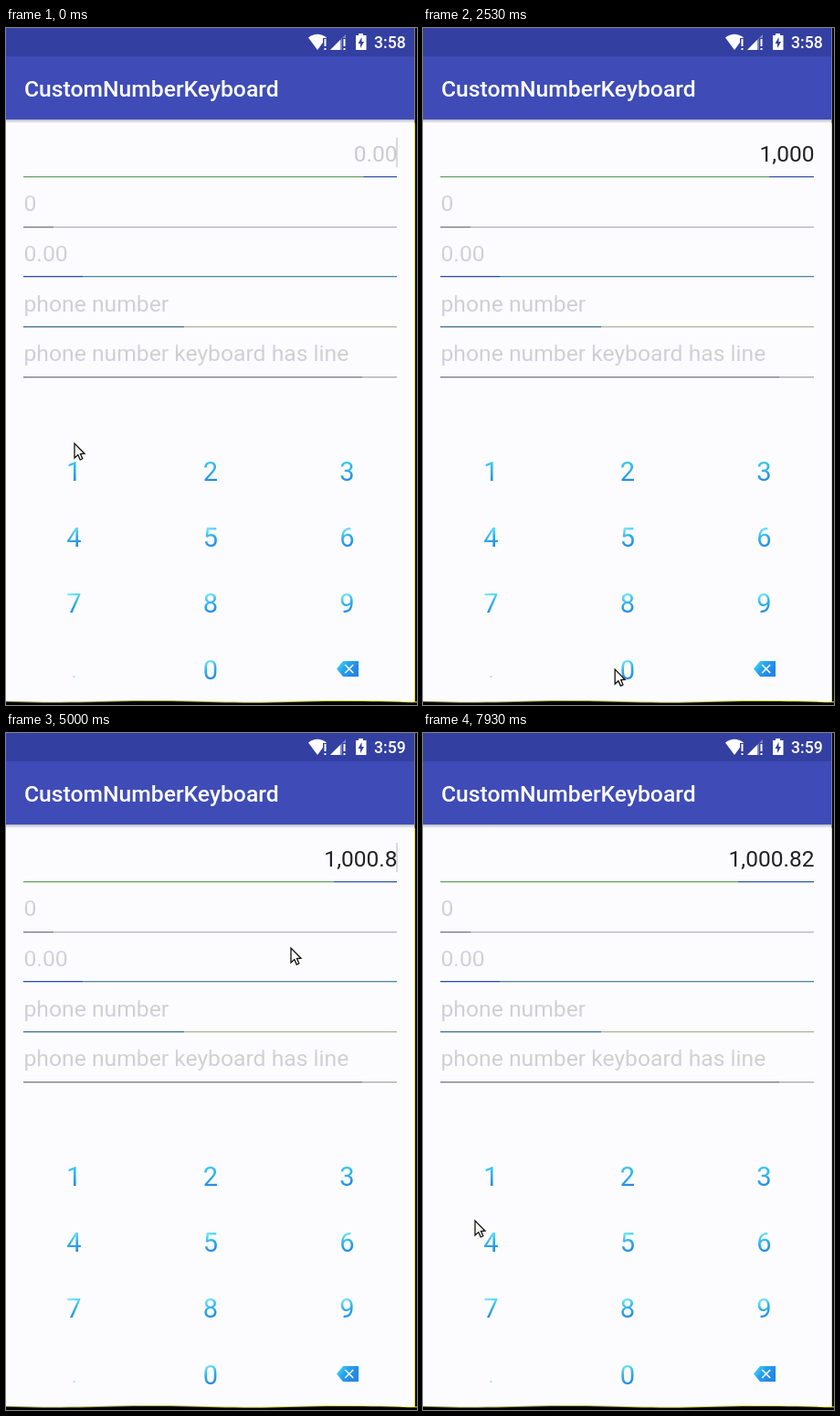
An HTML page with a canvas that plays this animation: 450x740 px, repeating every 8000 ms.

```html
<!DOCTYPE html>
<html lang="en">
<head>
<meta charset="utf-8">
<title>Number keyboard</title>
<style>
html, body { margin: 0; width: 100%; height: 100%; overflow: hidden; background: #000; }
canvas { display: block; }
</style>
</head>
<body>
<canvas id="stage" width="450" height="740"></canvas>
<script>
const ctx = document.getElementById('stage').getContext('2d');
const FONT = 'Roboto, "Open Sans", sans-serif';
const LOOP = 8000, BLINK = 500, TYPE_DELAY = 100, RIPPLE = 350, MOVE = 350;
const KEYS = '123456789.0<';
const PAD_TOP = 449, KEY_W = 149, KEY_H = 72;
const WHITE = '#fff', PAGE = '#fcfcfe', STATUS = '#3340a2';

// Where the pointer goes, when it arrives and when it taps there.
const stop = (x, y, at, ...taps) => ({ x, y, at, taps });
const stops = [
  stop(75, 454, 0, 30),
  stop(213, 701, 1130, 1140, 1300, 1820),
  stop(85, 703, 2850, 2980),
  stop(226, 634, 3420, 3440, 3590),
  stop(375, 639, 4200),
  stop(374, 698, 4400, 4480),
  stop(312, 235, 5000),
  stop(226, 488, 5270, 5300),
  stop(256, 212, 6130),
  stop(60, 250, 7000),
  stop(57, 533, 7900)
];

const keyX = i => 74.5 + 149.4 * (i % 3);
const keyY = i => 495 + 72.2 * Math.floor(i / 3);
const keyAt = (x, y) => Math.floor(x / KEY_W) + 3 * Math.floor((y - PAD_TOP) / KEY_H);
const taps = stops.flatMap(s => s.taps.map(at => ({ at, key: keyAt(s.x, s.y) })));

function pointerAt(t) {
  const next = stops.findIndex(s => s.at > t);
  if (next < 0) return stops[stops.length - 1];
  const a = stops[next - 1], b = stops[next];
  const leave = Math.max(a.at, b.at - MOVE);
  const u = Math.max(0, (t - leave) / (b.at - leave));
  const e = u * u * (3 - 2 * u);
  return { x: a.x + (b.x - a.x) * e, y: a.y + (b.y - a.y) * e };
}

function inputAt(t) {
  let raw = '', since = 0;
  for (const { at, key } of taps) {
    if (t < at + TYPE_DELAY) break;
    raw = KEYS[key] === '<' ? raw.slice(0, -1) : raw + KEYS[key];
    since = at + TYPE_DELAY;
  }
  const [whole, ...rest] = raw.split('.');
  const value = [whole.replace(/\B(?=(\d{3})+$)/g, ','), ...rest].join('.');
  return { value, caret: Math.floor((t - since) / BLINK) % 2 === 0 };
}

function gradient(x0, y0, x1, y1, ...colors) {
  const g = ctx.createLinearGradient(x0, y0, x1, y1);
  colors.forEach((c, i) => g.addColorStop(i / (colors.length - 1), c));
  return g;
}

function rect(x, y, w, h, fill) {
  ctx.fillStyle = fill;
  ctx.fillRect(x, y, w, h);
}

function poly(points, fill) {
  ctx.beginPath();
  points.forEach(([x, y]) => ctx.lineTo(x, y));
  ctx.closePath();
  ctx.fillStyle = fill;
  ctx.fill();
}

function text(str, x, y, size, fill, align = 'left', weight = 400) {
  ctx.font = `${weight} ${size}px ${FONT}`;
  ctx.textAlign = align;
  ctx.fillStyle = fill;
  ctx.fillText(str, x, y);
}

function alertMark(x) {
  rect(x - 1.5, 11, 4, 14, STATUS);
  rect(x, 12, 2, 8, WHITE);
  rect(x, 22, 2, 2, WHITE);
}

function drawStatus(t) {
  rect(0, 0, 447, 31, STATUS);
  ctx.beginPath();
  ctx.moveTo(341, 24);
  ctx.lineTo(331, 10.5);
  ctx.quadraticCurveTo(341, 3, 351, 10.5);
  ctx.fillStyle = WHITE;
  ctx.fill();
  alertMark(348.5);
  poly([[355, 24], [372, 24], [372, 7]], '#7d87c9');
  poly([[355, 24], [366, 24], [366, 13]], WHITE);
  alertMark(369.5);
  rect(386, 6, 5, 3, WHITE);
  rect(383, 8, 11.5, 16, WHITE);
  poly([[389.5, 10], [385.5, 17], [388, 17], [388, 22], [392, 15], [389.5, 15]], STATUS);
  text(t < 4500 ? '3:58' : '3:59', 403, 22, 17.6, WHITE, 'left', 500);
}

function drawHeader() {
  rect(0, 31, 447, 69, '#3f4cb7');
  rect(0, 100, 447, 4, gradient(0, 100, 0, 104, '#b9b9c6', PAGE));
  text('CustomNumberKeyboard', 20, 75, 24.7, WHITE, 'left', 500);
}

function drawField(row, hint, left, split, right) {
  const y = 145.5 + row * 54.7;
  if (row) text(hint, 19.5, y, 24.7, gradient(0, y - 18, 0, y, '#dad6e8', '#cfcfcd', '#d0d0e0'));
  const line = Math.round(162 + row * 54.7);
  rect(19, line, split - 19, 1.3, left);
  rect(split, line, 428 - split, 1.3, right);
}

function drawFields(t) {
  const { value, caret } = inputAt(t);
  const shown = value || '0.00';
  text(shown, 428.5, 145.5, 24.5, value ? '#222226' : '#cbc9d3', 'right');
  const split = 439 - ctx.measureText(shown).width;
  if (caret) rect(427.5, 120, 1, 32, '#b5b4ca');
  drawField(0, '', '#67a565', split, '#3559a8');
  drawField(1, '0', '#777784', 52, '#b3b3bb');
  drawField(2, '0.00', '#3449ad', 84, '#4d87a0');
  drawField(3, 'phone number', '#46708a', 195, '#abb99c');
  drawField(4, 'phone number keyboard has line', '#77777f', 390, '#a9a9a4');
}

function drawRipple(key, dt) {
  if (dt < 0 || dt > RIPPLE) return;
  const x = keyX(key) + 2, y = keyY(key) - 7;
  ctx.save();
  ctx.beginPath();
  ctx.rect(key % 3 * KEY_W, PAD_TOP + Math.floor(key / 3) * KEY_H, KEY_W, KEY_H);
  ctx.clip();
  ctx.globalAlpha = Math.min(1, (RIPPLE - dt) / 200);
  ctx.beginPath();
  ctx.arc(x, y, 8 + dt * 0.255, 0, Math.PI * 2);
  ctx.fillStyle = gradient(x, y - 30, x, y + 30, '#e6fbfb', '#e4f3fb', '#e9eefb');
  ctx.fill();
  ctx.restore();
}

function drawBackspace() {
  poly([[362, 700.5], [369, 692], [386, 692], [386, 709], [369, 709]],
    gradient(362, 692, 380, 706, '#4fe6f8', '#25a4ee', '#2585e6'));
  ctx.beginPath();
  for (const side of [-1, 1]) {
    ctx.moveTo(375.7 - 4.5 * side, 696);
    ctx.lineTo(375.7 + 4.5 * side, 705);
  }
  ctx.strokeStyle = WHITE;
  ctx.lineWidth = 1.6;
  ctx.stroke();
}

function drawKey(i, t) {
  const k = KEYS[i], x = keyX(i), y = keyY(i);
  if (k === '<') return drawBackspace();
  if (k === '.') {
    const lit = taps.some(p => p.key === i && t >= p.at && t <= p.at + RIPPLE);
    const s = lit ? 3.4 : 2;
    return rect(x - s / 2, 709 - s / 2, s, s, lit ? '#2a8ee8' : '#a4e6f3');
  }
  const top = i < 3 ? '#3bcbf3' : '#7deaf8';
  text(k, x, y, 29, gradient(x - 4, y - 21, x + 4, y - 1, top, '#2fb0ee', '#2589e7'), 'center');
}

// Black border with an uneven yellow fringe.
function drawFrame() {
  rect(447.5, 0, 2.5, 740, '#000');
  rect(447, 104, 1, 632, '#d8d850');
  const edge = [];
  for (let x = 0; x <= 450; x += 10) edge.push([x, 736.8 + 0.9 * Math.sin(x / 34)]);
  poly([...edge.map(([x, y]) => [x, y - 1]), [450, 740], [0, 740]],
    gradient(0, 0, 450, 0, '#77772a', '#a8a830', '#e8e840'));
  poly([...edge, [450, 740], [0, 740]], '#000');
}

function drawPointer(t) {
  const { x, y } = pointerAt(t);
  ctx.save();
  ctx.translate(x, y);
  poly([[0, 0], [0, 16], [3.8, 12.6], [6.2, 18], [8.8, 16.8], [6.5, 11.5], [11, 11.2]], '#fffff4');
  ctx.lineWidth = 1.3;
  ctx.strokeStyle = '#111';
  ctx.stroke();
  ctx.restore();
}

function draw(t) {
  rect(0, 0, 450, 740, PAGE);
  drawStatus(t);
  drawHeader();
  drawFields(t);
  taps.forEach(({ at, key }) => drawRipple(key, t - at));
  for (let i = 0; i < KEYS.length; i++) drawKey(i, t);
  drawFrame();
  drawPointer(t);
}

const start = performance.now();
function tick() {
  draw((performance.now() - start) % LOOP);
  requestAnimationFrame(tick);
}
tick();
</script>
</body>
</html>
```
